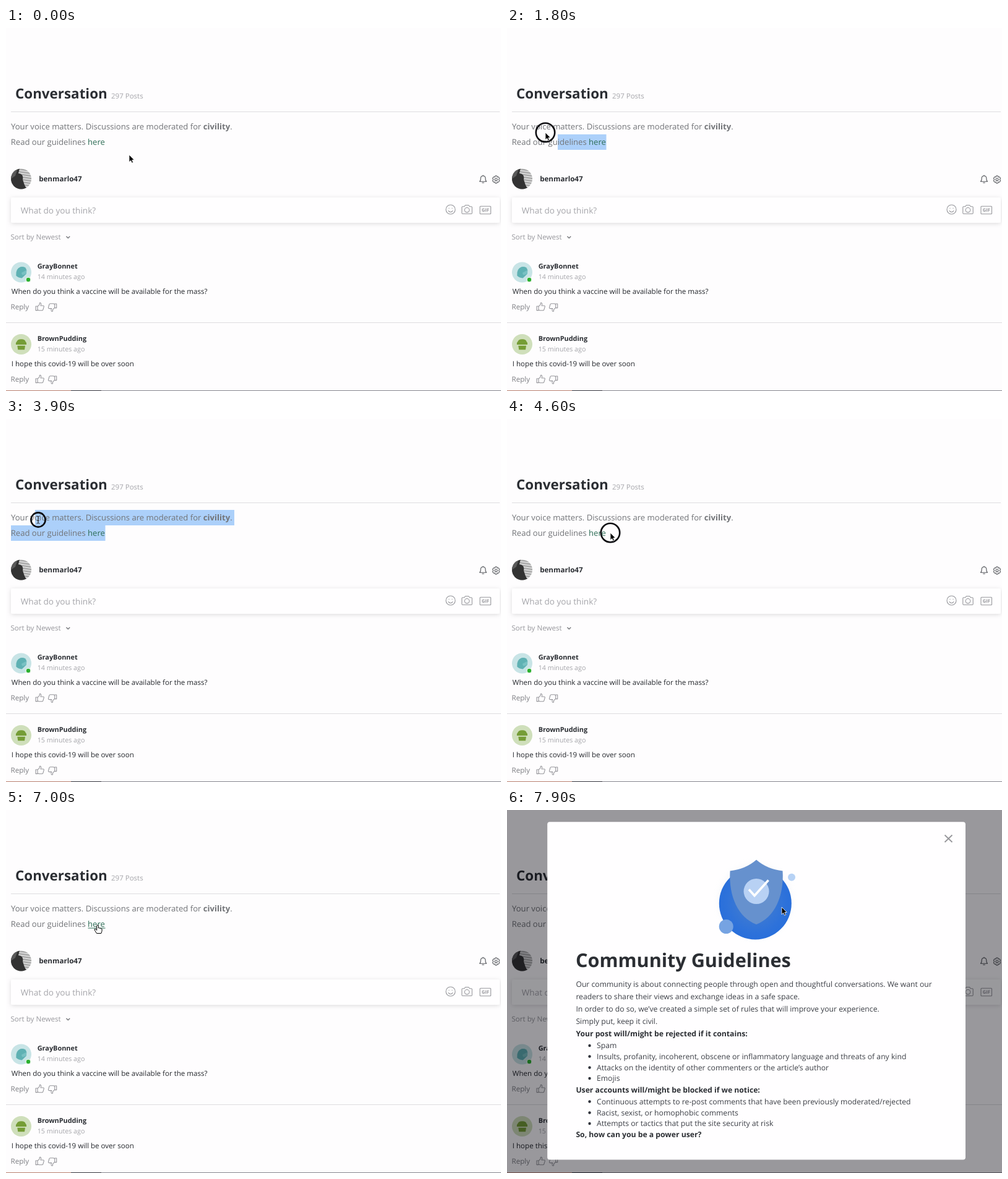
An HTML page that plays this animation: 800 by 587 pixels, repeating every 8000 ms.

```html
<!DOCTYPE html>
<html lang="en">
<head>
<meta charset="utf-8">
<title>Conversation</title>
<style>
  html, body { margin: 0; width: 100%; height: 100%; overflow: hidden; background: #fefdfe; }
  svg { display: block; width: 800px; height: 587px; font-family: "Open Sans", sans-serif; text-rendering: geometricPrecision; }
  .bold { font-weight: 700; }
  .dark { fill: #2b2e33; }
  .pale { fill: #a5a5aa; }
  .lead { font-size: 13.1px; fill: #727478; }
  .name { font-size: 10.9px; }
  .time { font-size: 10.7px; }
  .post { font-size: 11.55px; fill: #24272c; }
  .small { font-size: 11.6px; fill: #7c7d82; }
  .icon { fill: none; stroke: #97979c; stroke-width: 1.1; stroke-linejoin: round; stroke-linecap: round; }
  .copy { font-size: 12.2px; fill: #3c3f46; }
  .copy.bold { fill: #2b2e33; }
</style>
</head>
<body>
<svg viewBox="0 0 800 587">
  <defs>
    <clipPath id="face"><circle cx="24.5" cy="244" r="16.5"/></clipPath>
    <pattern id="blinds" width="6" height="4" patternUnits="userSpaceOnUse" patternTransform="rotate(8)">
      <path d="M0 0H6V2.4H0Z" fill="#d8d8d8"/><path d="M0 2.4H6V4H0Z" fill="#929292"/>
    </pattern>
    <filter id="soft" x="-5%" y="-40%" width="110%" height="190%">
      <feDropShadow dx="0" dy="1.5" stdDeviation="3.5" flood-opacity=".13"/>
    </filter>
    <radialGradient id="ball"><stop offset="0" stop-color="#4a80cc"/><stop offset=".8" stop-color="#2e72da"/><stop offset="1" stop-color="#296fdb"/></radialGradient>
    <radialGradient id="glow"><stop offset=".75" stop-color="#f8f8fa"/><stop offset="1" stop-color="#fff" stop-opacity="0"/></radialGradient>
    <linearGradient id="shimmer" gradientUnits="userSpaceOnUse" x1="120" x2="520" y1="0" y2="0" spreadMethod="reflect">
      <stop offset="0" stop-color="#e9e9ea"/><stop offset=".6" stop-color="#d9dadb"/><stop offset="1" stop-color="#d9dadb"/>
    </linearGradient>
    <path id="thumb" d="M0 6H3V12.6H0ZM3 6.4 6.2 3.2V.8Q7.6-.4 8.5 1.4T8 5H12Q13.6 5.2 13.2 6.8L11.8 11.6Q11.4 12.8 10.2 12.8H5.2L3 11.8"/>
    <g id="actions">
      <text class="small" x="7.5" y="455">Reply</text>
      <g class="icon">
        <use href="#thumb" x="48" y="444"/>
        <use href="#thumb" transform="translate(81.7 458.6) rotate(180)"/>
      </g>
    </g>
  </defs>

  <rect width="800" height="587" fill="#fefdfe"/>
  <path id="marked" fill="#acd0fa"/>

  <text class="bold dark" x="15" y="114" font-size="22.4">Conversation</text>
  <text class="pale" x="170" y="114" font-size="11.5">297 Posts</text>
  <path d="M8 135.5H798M0 476.5H800" stroke="#dddde0"/>
  <text class="lead" x="8" y="164">Your voice matters. Discussions are moderated for <tspan class="bold">civility</tspan>.</text>
  <text class="lead" x="7.7" y="189">Read our guidelines <tspan fill="#2f6e57">here</tspan></text>
  <path id="underline" d="M132.5 191H160.5" stroke="#2f6e57"/>

  <g clip-path="url(#face)">
    <rect x="8" y="227" width="33" height="34" fill="url(#blinds)"/>
    <path d="M8 227H22L20 235Q29 236 27 245L30 254 34 261H8Z" fill="#333"/>
    <path d="M8 227H19L15 239 8 244Z" fill="#5a5a5a"/>
  </g>
  <text class="bold dark" x="53.2" y="248" font-size="11.6">benmarlo47</text>
  <g class="icon" style="stroke:#55575c">
    <path d="M765.5 248.3H776.5Q774.8 247 774.8 242.8 774.6 239.2 771 239 767.4 239.2 767.2 242.8 767.2 247 765.5 248.3ZM769.7 250.3H772.3M771 238V239"/>
    <circle cx="792" cy="245" r="2"/>
    <path d="M790.7 239H793.3L793.9 241 796 240.8 797.6 243 796.4 245 797.6 247 796 249.3 793.9 249 793.3 251H790.7L790.1 249 788 249.3 786.4 247 787.6 245 786.4 243 788 240.8 790.1 241Z"/>
  </g>

  <rect x="8" y="274" width="790" height="41" rx="3" fill="#fffeff" filter="url(#soft)"/>
  <text class="pale" x="23.8" y="300" font-size="13.55">What do you think?</text>
  <g class="icon">
    <circle cx="718.5" cy="293.5" r="7.5"/>
    <path d="M715 295.7Q718.5 299.7 722 295.7M716 291.3V291.6M721 291.3V291.6"/>
    <path d="M738 288.7H740.8L742.3 286.5H747.7L749.2 288.7H752Q753.2 288.9 753.2 290V299Q753.2 300.5 752 300.5H738Q736.8 300.5 736.8 299V290Q736.8 288.9 738 288.7Z"/>
    <circle cx="745" cy="294.3" r="3.8"/>
    <rect x="766" y="288.3" width="17.5" height="12.5" rx="1"/>
    <path d="M97.8 337.3 100.3 339.8 102.8 337.3" style="stroke:#77787d;stroke-width:1.4"/>
  </g>
  <text class="bold" x="774.8" y="297.4" font-size="7.6" text-anchor="middle" fill="#97979c">GIF</text>
  <text class="small" x="7.5" y="342" style="fill:#98989d">Sort by Newest</text>

  <circle cx="24.5" cy="395" r="16.5" fill="#c8e4e6"/>
  <path d="M16.3 400.5Q15.5 389 23.5 386.3 31.5 384.8 33.2 391.5L33 397.5 25.7 404.5Q19.5 404 16.3 400.5Z" fill="#5fb1b3"/>
  <path d="M25.5 395.5 33.2 391.5 33 397.5 27 399.5Q24.5 398 25.5 395.5Z" fill="#79c1c3"/>
  <circle cx="36" cy="407" r="3.9" fill="#2bb02f" stroke="#fefdfe"/>
  <text class="bold dark name" x="50.7" y="389">GrayBonnet</text>
  <text class="pale time" x="50.7" y="406">14 minutes ago</text>
  <text class="post" x="8.8" y="430">When do you think a vaccine will be available for the mass?</text>
  <use href="#actions"/>

  <circle cx="24.5" cy="511.5" r="16.5" fill="#cfdfbb"/>
  <path d="M16 512Q15.5 508.5 17.5 507 18.5 503.5 24.5 503.3T31.5 507Q33.5 508.5 33 512ZM18.3 513.7H31L30 520.3H19.3Z" fill="#759d36"/>
  <text class="bold dark name" x="50.7" y="506">BrownPudding</text>
  <text class="pale time" x="50.7" y="523">15 minutes ago</text>
  <text class="post" x="8.8" y="547">I hope this covid-19 will be over soon</text>
  <use href="#actions" y="117"/>
  <path d="M0 586.5H800" stroke="#85858c"/>
  <path d="M0 586.5H105" stroke="#b9806f"/>
  <path d="M105 586.5H154" stroke="#33343c"/>

  <g id="modal">
    <rect width="800" height="587" fill="#020008" opacity=".4"/>
    <rect x="65.2" y="19.2" width="675.8" height="546.3" rx="4" fill="#fffeff"/>
    <path d="M707.5 40.5 719.5 52M719.5 40.5 707.5 52" stroke="#97979b" stroke-width="1.8"/>
    <circle cx="401" cy="147" r="72" fill="url(#glow)"/>
    <circle cx="401.3" cy="151" r="58.5" fill="url(#ball)"/>
    <path d="M403 80.5Q420 95.5 445.5 98.5C448 140 432 174 403 185 374 174 358 140 360.5 98.5Q386 95.5 403 80.5Z" fill="#6691ce"/>
    <circle cx="403" cy="131.5" r="20.5" fill="#b8d1f4"/>
    <path d="M391 128.5 400 138.5 422.5 113.5" fill="none" stroke="#fff" stroke-width="3.6"/>
    <circle cx="354.2" cy="188.5" r="11.5" fill="#76a3e2"/>
    <circle cx="460" cy="108.7" r="6" fill="#b7d2f5"/>
    <g id="skeleton" fill="url(#shimmer)">
      <circle cx="400" cy="298.5" r="64.3"/>
      <rect x="120" y="425" width="335" height="26" rx="9"/>
      <rect x="120" y="478.5" width="397" height="23" rx="9"/>
      <path d="M127 538.5H650" stroke="#f4f4f6"/>
    </g>
    <g id="rules"><text class="bold dark" x="111" y="253.5" font-size="30.6">Community Guidelines</text></g>
  </g>

  <circle id="ring" fill="none" stroke="#0c0c10" stroke-width="2.6"/>
  <g id="pointer">
    <path id="arrow" d="M0 0V11.8L2.7 9.3 4.5 13.3 6.5 12.4 4.8 8.5H8.3Z" fill="#000" stroke="#fff" stroke-width=".8"/>
    <path id="beam" d="M-2.5-6Q0-6 0-4.5 0-6 2.5-6M0-4.5V4.5M-2.5 6Q0 6 0 4.5 0 6 2.5 6M-1.5 1.5H1.5" fill="none" stroke="#222"/>
    <path id="hand" d="M-1.3 1V8L-3.2 6Q-5.5 5.3-4.8 7.5L-1.5 13H5.8Q7.3 10 7.2 6.5 6.8 4.8 5.4 5.5 4.8 4 3.2 4.7 2.5 3.8 1.3 4.3V1Q1-.5 0-.5T-1.3 1Z" fill="#fff" stroke="#000"/>
  </g>
</svg>
<script>
const LOOP = 8000, STEP = 100;
const DOWN = 1600, UP = 5100, OPEN = 7100, LOADED = 7500;
const $ = id => document.getElementById(id);
const show = (id, on) => $(id).setAttribute('visibility', on ? 'inherit' : 'hidden');

function add(parent, tag, attrs, text = '') {
  const el = document.createElementNS('http://www.w3.org/2000/svg', tag);
  for (const key in attrs) el.setAttribute(key, attrs[key]);
  el.textContent = text;
  parent.append(el);
}

// '#' marks a bold heading, '*' a bullet
const rules = [
  [286, 'Our community is about connecting people through open and thoughtful conversations. We want our'],
  [306, 'readers to share their views and exchange ideas in a safe space.'],
  [326, 'In order to do so, we’ve created a simple set of rules that will improve your experience.'],
  [346, 'Simply put, keep it civil.'],
  [366, '#Your post will/might be rejected if it contains:'],
  [385, '*Spam'],
  [402.5, '*Insults, profanity, incoherent, obscene or inflammatory language and threats of any kind'],
  [420.5, '*Attacks on the identity of other commenters or the article’s author'],
  [438, '*Emojis'],
  [456.5, '#User accounts will/might be blocked if we notice:'],
  [475.5, '*Continuous attempts to re-post comments that have been previously moderated/rejected'],
  [493.5, '*Racist, sexist, or homophobic comments'],
  [511, '*Attempts or tactics that put the site security at risk'],
  [529, '#So, how can you be a power user?'],
];
for (const [y, line] of rules) {
  const bullet = line[0] === '*', bold = line[0] === '#';
  if (bullet) add($('rules'), 'circle', { cx: 133.5, cy: y - 4, r: 2.2, fill: '#30333b' });
  add($('rules'), 'text', { class: bold ? 'copy bold' : 'copy', x: bullet ? 145 : 111.4, y }, line.replace(/^[#*]/, ''));
}

// pointer route: time, x, y
const route = [
  [0, 199, 205], [500, 199, 205], [1200, 166, 185], [1600, 164, 185], [1700, 82, 176],
  [1800, 62, 169], [2000, 18, 163], [2400, 40, 164], [2800, 96, 165], [3200, 34, 164],
  [3500, 74, 165], [3800, 47, 163], [3900, 52, 163], [4200, 18, 163], [4300, 62, 169],
  [4400, 125, 179], [4500, 162, 184], [4600, 167, 184], [4800, 166.5, 185], [5200, 166.5, 185],
  [5800, 147, 186], [6600, 147, 186], [6800, 148, 186.5], [7000, 148, 186.5], [7100, 147, 186],
  [7600, 147, 186], [7900, 444, 157], [8000, 444, 157],
];
function pointerAt(t) {
  const i = Math.max(1, route.findIndex(stop => stop[0] >= t));
  const [t0, x0, y0] = route[i - 1], [t1, x1, y1] = route[i];
  const k = (t - t0) / (t1 - t0);
  return [x0 + (x1 - x0) * k, y0 + (y1 - y0) * k];
}

// the selection trails the pointer by one step
function selection(t) {
  if (t <= DOWN || t >= UP) return '';
  const [x, y] = pointerAt(t - STEP);
  const left = Math.max(8, x);
  if (y < 172) return `M${left} 147H369V172H160.5V197H8V172H${left}Z`;
  return left < 160 ? `M${left} 172H160.5V197H${left}Z` : '';
}

function draw(now) {
  const t = Math.floor(now % LOOP / STEP) * STEP;
  const [x, y] = pointerAt(t);
  const down = t >= DOWN && t < UP;
  const beam = down && y < 167;
  const hand = t >= UP && t < OPEN && x < 160;

  $('marked').setAttribute('d', selection(t));
  show('underline', hand);
  show('beam', beam);
  show('hand', hand);
  show('arrow', !beam && !hand);
  $('pointer').setAttribute('transform', `translate(${x} ${y})`);

  show('ring', down);
  $('ring').setAttribute('cx', x);
  $('ring').setAttribute('cy', y);
  $('ring').setAttribute('r', beam ? 11.6 : 15.2);

  show('modal', t >= OPEN);
  show('skeleton', t >= OPEN && t < LOADED);
  show('rules', t >= LOADED);
  $('shimmer').setAttribute('gradientTransform', `translate(${Math.max(0, t - OPEN)} 0)`);
  requestAnimationFrame(draw);
}
requestAnimationFrame(draw);
</script>
</body>
</html>
```
